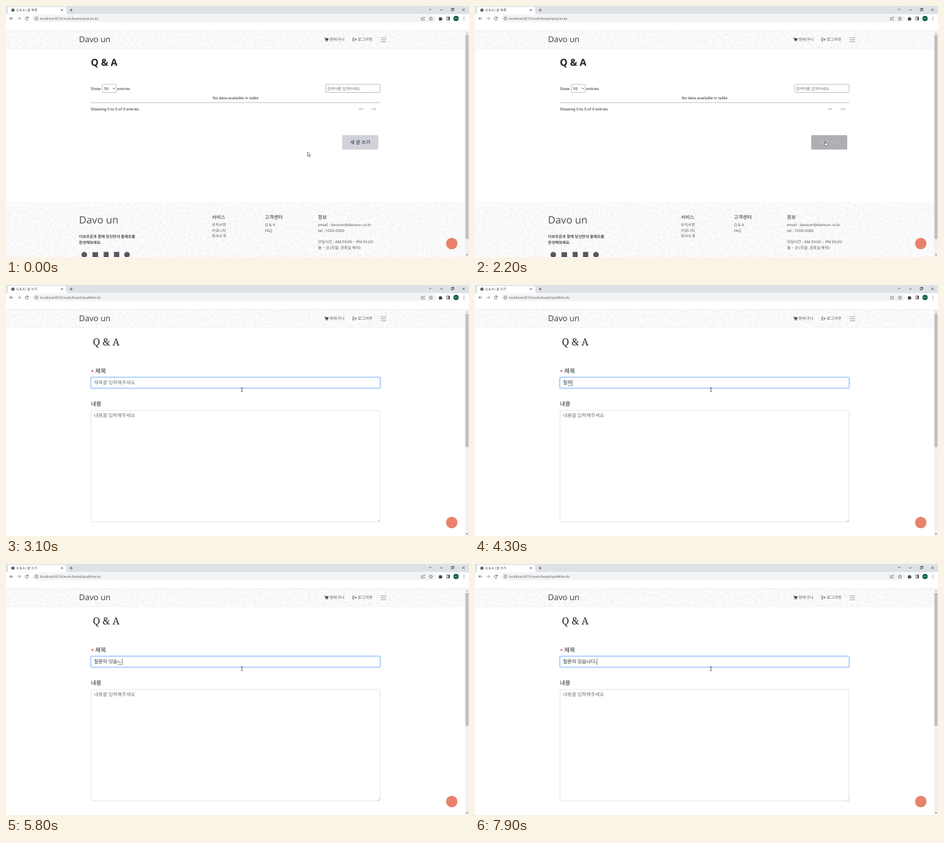
An HTML page that plays this animation: 704x382 px, repeating every 8 s.

```html
<!DOCTYPE html>
<html lang="ko">
<head>
<meta charset="utf-8">
<title>Q &amp; A</title>
<style>
html, body { margin: 0; width: 100%; height: 100%; overflow: hidden; background: #fff; }
svg { display: block; }
#stage { width: 100vw; height: 100vh; }
text { font-family: "Noto Sans", "Noto Sans CJK KR", "Noto Sans CJK", sans-serif; font-size: 5.87px; fill: #212529; white-space: pre; text-rendering: geometricPrecision; }
.ui { font-family: Roboto, "Noto Sans CJK KR", "Noto Sans CJK", sans-serif; }
.line { fill: none; stroke: #4a4d51; stroke-width: .8; }
.thin { stroke-width: .6; }
.squiggle { fill: none; stroke: #f0f0f3; stroke-width: .9; }
</style>
</head>
<body>
<svg id="stage" viewBox="0 0 704 382" preserveAspectRatio="none">
  <rect width="704" height="382" fill="#fff"/>

  <g id="chrome">
    <rect width="704" height="12.5" fill="#dee1e6"/>
    <path d="M1 12.5Q3 12.5 3 10V4Q3 1.5 5.5 1.5H89Q91.500 1.5 91.500 4V10Q91.500 12.500 93.500 12.500Z" fill="#fff"/>
    <circle id="globe" cx="10.500" cy="6.200" r="2.500" fill="#5f6368"/>
    <path id="spinner" d="M10.500 3.800A2.400 2.400 0 0 1 12.900 6.200" fill="none" stroke="#8a9097" stroke-width=".7"/>
    <path class="line" d="M83.500 4.700l3 3m0-3l-3 3M96.800 6.200h4.600m-2.300-2.300v4.600M643.300 4.300l1.800 1.800l1.800-1.800M660 6h4M677 4.500h3v3h-3zM678 4.500v-1h3v3h-1M693.800 4l3.600 3.600m0-3.600l-3.600 3.600"/>
    <path class="line" d="M10.800 19H5.800m2.300-2.300L5.800 19l2.300 2.300"/>
    <path class="line" d="M17.500 19h5m-2.300-2.300l2.300 2.300l-2.300 2.300" style="stroke:#85898e"/>
    <path id="reload" class="line" d="M33.600 17.800A2.300 2.300 0 1 0 33.900 19.800M33.900 16.300v1.900h-1.900"/>
    <path id="stop" class="line" d="M29.500 17l4 4m0-4l-4 4"/>
    <rect x="40" y="13.800" width="614" height="10.600" rx="5.300" fill="#f1f3f4"/>
    <circle cx="46.300" cy="19" r="2.300" class="line thin"/>
    <path class="line thin" d="M46.300 18.700v1.600M46.300 17.400v.6"/>
    <path class="line thin" d="M633 17.500h-1.300v3.800h4.600v-1.300M633.300 19.800q.3-2.300 3-2.300m-1-1.300l1.300 1.300l-1.300 1.300"/>
    <path class="line thin" d="M646 16.400l.8 1.800l2 .2l-1.500 1.300l.5 2l-1.800-1.100l-1.800 1.100l.5-2l-1.500-1.300l2-.2z"/>
    <path d="M658.200 17.600h1.300a.9.9 0 0 1 1.900 0h1.400v1.300a.9.9 0 0 1 0 1.900v1.300h-4.600z" fill="#44474b"/>
    <rect x="670.200" y="16.800" width="4.400" height="4.400" class="line"/>
    <rect x="672.600" y="16.800" width="2" height="4.400" fill="#44474b"/>
    <circle cx="684.300" cy="19" r="4" fill="#0b5c4a"/>
    <g fill="#44474b"><circle cx="696.300" cy="17" r=".6"/><circle cx="696.300" cy="19" r=".6"/><circle cx="696.300" cy="21" r=".6"/></g>
    <path d="M0 37.700H704" stroke="#dfe1e4" stroke-width=".6"/>
  </g>

  <svg x="0" y="38" width="698" height="27"><rect width="698" height="27" fill="#fbfbfc"/><path class="squiggle"/></svg>
  <path d="M0 65H698" stroke="#efeff1" stroke-width=".6"/>
  <g id="nav">
    <path d="M484 48.500h1.200l1 3.600h3.100l.8-2.700h-4.400" fill="#3f4246" stroke="#3f4246" stroke-width=".7"/>
    <circle cx="486.500" cy="53.300" r=".7" fill="#3f4246"/><circle cx="489" cy="53.300" r=".7" fill="#3f4246"/>
    <path class="line" d="M529.300 48.700h-1.800v4.700h1.800M529 51h3.500m-1.600-1.800l1.800 1.800l-1.800 1.800"/>
    <path d="M569.500 48.300h8.700M569.500 51.400h8.700M569.500 54.500h8.700" stroke="#7c7f83" stroke-width=".7"/>
  </g>

  <g id="list">
    <rect x="146.300" y="119.200" width="21.400" height="12.300" rx="1" fill="#fff" stroke="#aaa" stroke-width=".7"/>
    <path class="line" d="M162.800 124.700l1.500 1.500l1.500-1.500" style="stroke:#222"/>
    <rect x="486.200" y="119.200" width="82.600" height="12.300" rx="1" fill="#fff" stroke="#aaa" stroke-width=".7"/>
    <path d="M129 147H569" stroke="#999" stroke-width=".6"/>
    <rect id="button" x="511.200" y="196.600" width="54.800" height="22" rx="1.500"/>
    <svg x="0" y="298" width="698" height="84"><rect width="698" height="84" fill="#fbfbfc"/><path class="squiggle"/></svg>
    <g fill="#55585c"><circle cx="119" cy="378.500" r="4.300"/><rect x="131.500" y="374.700" width="8.500" height="7.600"/><rect x="148.500" y="374.300" width="7.500" height="8"/><rect x="164.200" y="374.300" width="8" height="8"/><circle cx="184" cy="378.500" r="4.300"/></g>
  </g>

  <g id="write">
    <rect id="glow" x="128.500" y="140" width="441" height="17.600" rx="2.300" fill="none" stroke="#c2dbfe"/>
    <rect x="129.300" y="140.800" width="439.400" height="16" rx="1.500" fill="#fff" stroke="#86b7fe" stroke-width=".7"/>
    <rect x="129.300" y="191" width="439.400" height="169.700" rx="1.500" fill="#fff" stroke="#ced4da" stroke-width=".6"/>
    <path d="M565.500 360l2.500-2.500M567 360l1-1" stroke="#777" stroke-width=".5"/>
    <path id="under" stroke="#333" stroke-width=".5"/>
    <path id="caret" stroke="#222" stroke-width=".6"/>
  </g>

  <rect x="698" y="38" width="6" height="344" fill="#f1f1f1"/>
  <rect id="thumb" x="698.500" y="44" width="5" fill="#c1c1c1"/>
  <path d="M699.500 42l1.500-1.800l1.500 1.800z" fill="#a5a5a5"/>
  <path d="M699.500 378l1.500 1.800l1.500-1.800z" fill="#555"/>
  <circle id="badge" cx="677.800" cy="361.500" r="8.700" fill="#e9826b"/>

  <g id="pointer">
    <path id="arrow" d="M0 0V6.700L1.500 5.300L2.500 7.500L3.500 7L2.500 4.900H4.600Z" fill="#fff" stroke="#222" stroke-width=".55"/>
    <path id="hand" d="M-.6 0Q0-.8.6 0V2.400L2.700 3Q3.200 3.300 3 4.600L2.500 6.400H-.6L-2.200 3.900Q-2 3-.6 4Z" fill="#fff" stroke="#222" stroke-width=".55"/>
    <path id="beam" d="M-1.300-3H-.3Q0-3 0-2.600Q0-3 .3-3H1.300M0-2.600V2.600M-1.300 3H-.3Q0 3 0 2.600Q0 3 .3 3H1.300" fill="none" stroke="#222" stroke-width=".65"/>
  </g>
</svg>
<script>
const $ = id => document.getElementById(id);
const NS = "http://www.w3.org/2000/svg";

function label(parent, x, y, str, style = "", cls = "") {
  const el = document.createElementNS(NS, "text");
  el.setAttribute("x", x);
  el.setAttribute("y", y);
  el.setAttribute("class", cls);
  el.style.cssText = style;
  el.textContent = str;
  $(parent).append(el);
  return el;
}

const big = "font-size:7.33px;";
const gray = "fill:#55595e;";
const heavy = "font-weight:700;fill:#44474b";
const tabTitle = label("chrome", 16, 8, "", "font-size:5.1px;fill:#3c4043", "ui");
const url = label("chrome", 52, 20.8, "", "font-size:5.13px;fill:#5f6368", "ui");
label("chrome", 684.3, 20, "비단", "font-size:2.7px;fill:#fff;text-anchor:middle", "ui");

label("nav", 111, 55.2, "Davo un", "font-size:12.3px;fill:#44474b");
label("nav", 492, 53.2, "장바구니", "font-size:6.2px;" + gray);
label("nav", 534.8, 53.2, "로그아웃", "font-size:6.2px;" + gray);

label("list", 129, 90.5, "Q & A", "font-size:14.67px;font-weight:600");
label("list", 129, 127.7, "Show");
label("list", 149, 127.7, "10", "fill:#000");
label("list", 169.3, 127.7, "entries");
label("list", 488.2, 127.6, "검색어를 입력하세요.", "fill:#757575");
label("list", 349, 141.7, "No data available in table", "text-anchor:middle");
label("list", 129, 158.6, "Showing 0 to 0 of 0 entries");
label("list", 536.5, 158.6, "<<", "fill:#666");
label("list", 556.3, 158.6, ">>", "fill:#666");
const buttonText = label("list", 538.6, 210.4, "새 글 쓰기", big + "text-anchor:middle");

label("list", 111, 331, "Davo un", "font-size:15.4px;fill:#55585c");
label("list", 111, 353.3, "다보우운과 함께 당신만의 팔레트를", heavy);
label("list", 111, 362, "완성해보세요.", heavy);
const columns = [
  [313, "서비스", "공지사항", "커뮤니티", "회사소개"],
  [393.7, "고객센터", "Q & A", "FAQ"],
  [474.3, "정보", "email : davoun@davoun.co.kr", "tel : 1000-0000", "",
    "상담시간 : AM 09:00 ~ PM 05:00", "월 ~ 금 (주말, 공휴일 제외)"]
];
for (const [x, head, ...rows] of columns) {
  label("list", x, 323.8, head, big + "font-weight:500");
  rows.forEach((row, i) => label("list", x, 334.8 + i * 8.8, row, gray));
}

label("write", 132, 91.5, "Q & A", "font-family:'Noto Serif',serif;font-size:15px;font-weight:500");
label("write", 129.3, 135, "*", "font-size:8px;fill:#d22");
label("write", 135.8, 134.4, "제목", "font-size:8.8px");
label("write", 129, 184.4, "내용", "font-size:8.8px");
label("write", 133.7, 201.4, "내용을 입력해주세요", big + "fill:#6c757d");
const field = label("write", 133.7, 151.4, "", big);
$("write").append($("under"), $("caret"));

// Scattered curls for the header and footer backdrop
function squiggles() {
  let seed = 7, d = "";
  const rnd = () => (seed = seed * 16807 % 2147483647) / 2147483647;
  const f = n => n.toFixed(1);
  for (let y = 1; y < 86; y += 5) {
    for (let x = 0; x < 700; x += 5.5) {
      const a = rnd() * 6.283, c = Math.cos(a) * 2.6, s = Math.sin(a) * 2.6, bend = rnd() < .5 ? 1 : -1;
      d += `M${f(x + rnd() * 3)} ${f(y + rnd() * 3)}q${f(c / 2 - s * bend * .8)} ${f(s / 2 + c * bend * .8)} ${f(c)} ${f(s)}t${f(c * .6)} ${f(s * .6)}`;
    }
  }
  return d;
}
const curls = squiggles();
for (const p of document.querySelectorAll(".squiggle")) p.setAttribute("d", curls);

const path = [
  [0, 458.6, 222], [700, 458.6, 222], [900, 463.6, 218.3], [1200, 463.6, 218.3], [1400, 468.6, 216.3],
  [1600, 468.6, 216.3], [1700, 486.4, 211.8], [2100, 533, 206], [2300, 533, 206],
  [2500, 396.6, 184], [2800, 358.7, 159.3], [8000, 358.7, 159.3]
];
const typed = [
  [3600, "ㅈ"], [3700, "지"], [4000, "질"], [4200, "질ㅁ"], [4300, "질무"], [4400, "질문"],
  [4500, "질문이"], [4600, "질문이 "], [5000, "질문이 ㅇ"], [5100, "질문이 이"], [5200, "질문이 잇"],
  [5300, "질문이 잇스"], [5400, "질문이 잇습ㄴ"], [5600, "질문이 잇습니"], [5800, "질문이 잇습ㄴ"],
  [5900, "질문이 잇습"], [6000, "질문이 잇스"], [6100, "질문이 잇ㅅ"], [6200, "질문이 잇"],
  [6300, "질문이 이"], [6400, "질문이 ㅇ"], [6500, "질문이 "], [6700, "질문이 이"], [6800, "질문이 있"],
  [6900, "질문이 있스"], [7000, "질문이 있습니"], [7100, "질문이 있습니다"], [7900, "질문이 있습니다."]
];

function place(t) {
  const i = Math.max(1, path.findIndex(p => p[0] > t));
  const [t0, x0, y0] = path[i - 1], [t1, x1, y1] = path[i];
  const k = (t - t0) / (t1 - t0);
  return [x0 + (x1 - x0) * k, y0 + (y1 - y0) * k];
}
const show = (id, on) => $(id).style.display = on ? "" : "none";
const mix = (a, b, k) => `rgb(${a.map((v, i) => Math.round(v + (b[i] - v) * k))})`;

function drawField(t) {
  const step = typed.filter(s => s[0] <= t).pop();
  const str = step ? step[1] : "";
  field.textContent = str || "제목을 입력해주세요";
  field.style.fill = str ? "#212529" : "#6c757d";
  const width = str ? field.getComputedTextLength() : 0;
  const end = 133.9 + width;
  const composing = /[ㄱ-ㅎ가-힣]$/.test(str) && t < 7600;
  show("under", composing);
  if (composing) $("under").setAttribute("d", `M${end - 6.6} 153.300H${end}`);
  $("caret").setAttribute("d", `M${end + .4} 144V153.600`);
  show("caret", str ? t < 7600 || t >= 7900 : t < 3000);
}

function draw(time) {
  const t = Math.floor(time / 100) * 100;
  const writing = t >= 2400, loading = writing && t < 2900;
  show("list", !writing);
  show("write", writing);
  show("globe", !loading);
  show("spinner", loading);
  show("reload", !loading);
  show("stop", loading);
  show("badge", !loading);
  $("spinner").setAttribute("transform", `rotate(${(t - 2500) * -.6} 10.500 6.200)`);
  tabTitle.textContent = "Q & A | 글 " + (writing ? "쓰기" : "목록");
  url.textContent = `localhost:8210/work/board/qna${writing ? "Write" : "List"}.do`;
  $("thumb").setAttribute("height", writing ? 202.5 : 310.5);
  $("glow").setAttribute("stroke-width", t < 2600 ? .8 : 1.5);

  const [x, y] = place(t);
  const over = !writing && x > 511;
  const k = Math.min(1, Math.max(0, (t - 1900) / 300));
  $("button").setAttribute("fill", mix([208, 209, 217], [174, 175, 179], k));
  buttonText.style.fill = mix([33, 37, 41], [197, 199, 202], k);
  $("pointer").setAttribute("transform", `translate(${x} ${y})`);
  show("hand", over);
  show("beam", t >= 2800);
  show("arrow", !over && t < 2800);
  if (writing) drawField(t);
}

const start = performance.now();
function tick() {
  draw((performance.now() - start) % 8000);
  requestAnimationFrame(tick);
}
tick();
</script>
</body>
</html>
```
